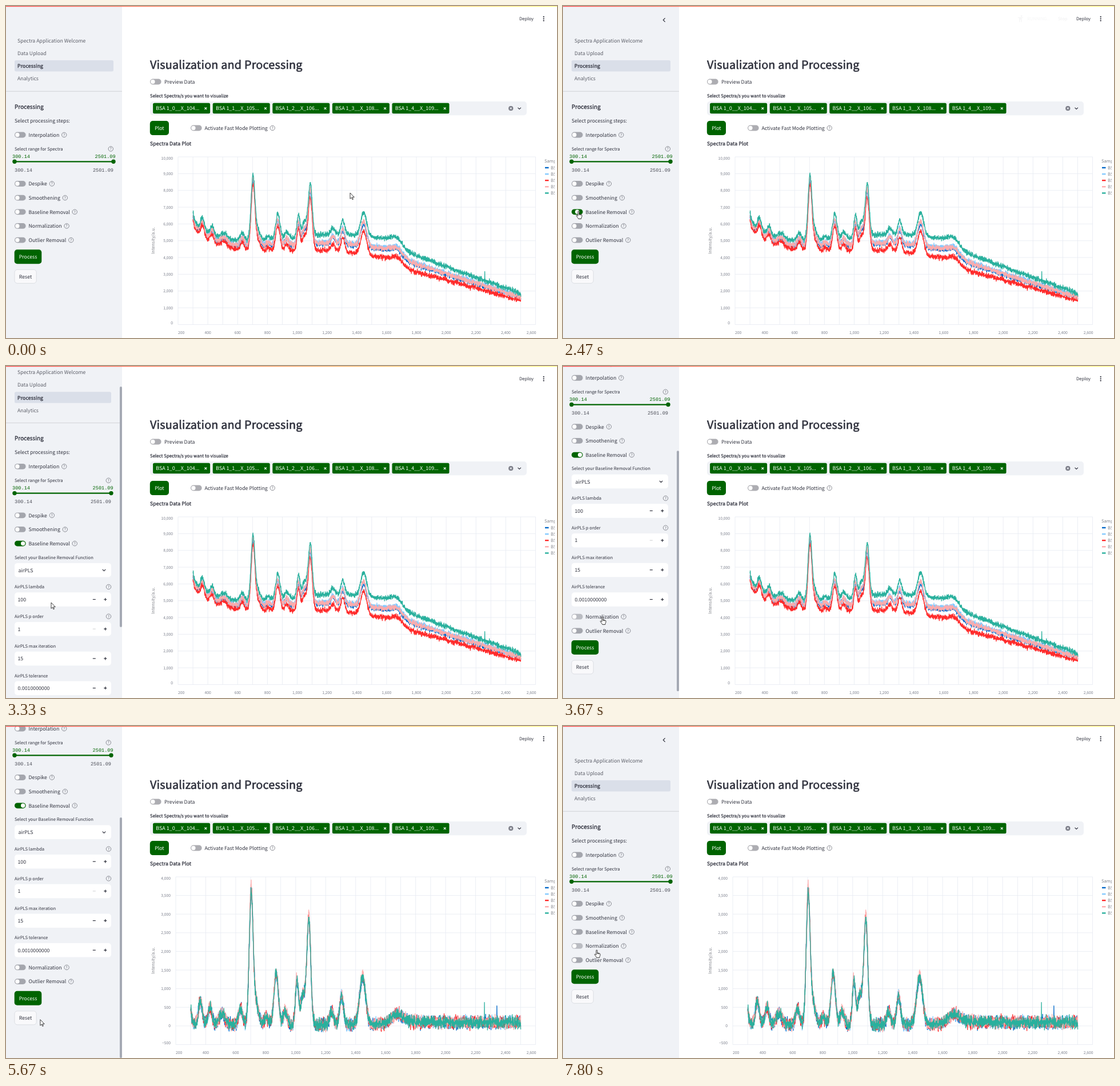
Animation, 964 px wide and 581 px high, one loop 8000 ms. Source, as an HTML page with a canvas:

```html
<!DOCTYPE html>
<html lang="en">
<head>
<meta charset="utf-8">
<title>Spectra processing</title>
<style>
html, body { margin: 0; width: 100%; height: 100%; overflow: hidden; background: #fff; }
canvas, svg { position: absolute; left: 0; top: 0; width: 964px; height: 581px; }
svg { overflow: hidden; }
text {
  font: 8.77px "Noto Sans CJK JP", "Noto Sans CJK SC", "Open Sans", sans-serif;
  fill: #31333f; text-rendering: geometricPrecision; white-space: pre;
}
.semi { stroke: #31333f; stroke-width: .034em; stroke-linejoin: round; letter-spacing: .011em; }
.title { font-size: 19.75px; }
.head { font-size: 9.88px; }
.small { font-size: 7.67px; }
.nav { fill: #5d5f69; }
.mono { font: 8.6px "Liberation Mono", monospace; fill: #4c4e58; }
.green { fill: #006400; }
.white { fill: #fff; }
.tag { font-size: 8.95px; fill: #fff; }
.gray { fill: #83858c; }
.end { text-anchor: end; }
.mid { text-anchor: middle; }
.line { fill: none; stroke: #31333f; stroke-width: 1.2; }
.help { fill: none; stroke: #6f717a; stroke-width: .8; }
.q { font-size: 6.3px; fill: #5d5f69; text-anchor: middle; }
</style>
</head>
<body>
<script>
const W = 964, H = 581, LOOP = 8000;
const FONT = '"Noto Sans CJK JP", "Noto Sans CJK SC", "Open Sans", sans-serif';

const clamp = (v, a = 0, b = 1) => Math.min(b, Math.max(a, v));
const ease = u => { u = clamp(u); return u * u * (3 - 2 * u); };
const bell = (x, c, w) => Math.exp(-((x - c) ** 2) / (2 * w * w));

// ---------- spectra ----------
const COLORS = ['#0068c9', '#83c9ff', '#ff2b2b', '#ffabab', '#29b09d'];
const DROP = [.58, .47, 1, .54, 0];

// Centre, height and, for broad ones, width.
const PEAKS = [
  [290, 560], [364, 620], [429, 470], [510, 290, 22], [632, 430], [703, 3480], [735, 560, 18],
  [805, 210], [870, 1350, 15], [930, 360], [1008, 1150, 10], [1050, 800, 18], [1088, 2750],
  [1240, 370], [1306, 760], [1446, 1270, 20], [1680, 240, 38]
];

function random(seed) {
  return () => {
    seed = seed + 0x6D2B79F5 | 0;
    let r = Math.imul(seed ^ seed >>> 15, 1 | seed);
    r = r + Math.imul(r ^ r >>> 7, 61 | r) ^ r;
    return ((r ^ r >>> 14) >>> 0) / 4294967296;
  };
}

function signal(x) {
  return PEAKS.reduce((sum, [c, h, w = 13]) => sum + h * bell(x, c, w), 30 + 70 * clamp((x - 1500) / 250));
}

// Decay plus a broad hump, then a step down onto a falling line.
function background(x, k) {
  const left = 4850 + 1350 * Math.exp((300 - x) / 120) + 500 * bell(x, 1250, 270);
  const right = 4150 - 3.2 * (x - 1750);
  const mix = 1 / (1 + Math.exp((1690 - x) / 20));
  return (left + (right - left) * mix) * (1 - DROP[k] * (.07 + .17 * clamp((x - 300) / 1400)));
}

function plot(left, lo, hi, step, raw) {
  const cv = document.createElement('canvas'), dpr = window.devicePixelRatio || 1;
  cv.width = W * dpr;
  cv.height = H * dpr;
  document.body.append(cv);
  const g = cv.getContext('2d');
  g.scale(dpr, dpr);
  const X = v => left + (v - 200) * (926.5 - left) / 2400;
  const Y = v => 557.5 - (v - lo) / (hi - lo) * 293.5;
  const line = (x1, y1, x2, y2) => { g.beginPath(); g.moveTo(x1, y1); g.lineTo(x2, y2); g.stroke(); };
  const label = v => v.toLocaleString('en-US').replace('-', '\u2212');

  g.textRendering = 'geometricPrecision';
  g.font = '6.75px ' + FONT;
  g.fillStyle = '#7d808d';
  g.strokeStyle = '#e6eaf1';
  g.lineWidth = .8;
  for (let v = 200; v <= 2600; v += 100) {
    line(X(v), 264, X(v), 557.5);
    if (v % 200) continue;
    g.textAlign = v === 200 ? 'left' : v === 2600 ? 'right' : 'center';
    g.fillText(label(v), X(v) + (v === 2600 ? 1 : 0), 573.8);
  }
  g.textAlign = 'right';
  for (let v = lo; v <= hi; v += step) {
    line(left, Y(v), 926.5, Y(v));
    g.fillText(label(v), left - 9, clamp(Y(v), 266.3, 554.8) + 2.5);
  }

  g.lineWidth = 1.3;
  g.lineJoin = 'round';
  COLORS.forEach((color, k) => {
    const rnd = random(71 + k * 13), gain = (raw ? 1.1 : 1) * (k === 3 ? 1.05 : 1);
    g.strokeStyle = color;
    g.beginPath();
    for (let x = 300; x <= 2501; x++) {
      const noise = (rnd() + rnd() + rnd() - 1.5) * 160;
      const spike = k === 4 && x === 2259 ? 530 : k === 0 && x === 2342 ? 340 : 0;
      g.lineTo(X(x), Y(signal(x) * gain + noise + spike + (raw ? background(x, k) : 0)));
    }
    g.stroke();
  });
  return cv;
}

const rawPlot = plot(301, 0, 10000, 1000, true);
const cleanPlot = plot(297, -500, 4000, 500, false);

// ---------- page ----------
const ruler = document.createElement('canvas').getContext('2d');
ruler.font = '8.77px ' + FONT;

const text = (x, y, s, cls = '') => `<text x="${x}" y="${y}" dy=".38em" class="${cls}">${s}</text>`;
const box = (x, y, w, h, fill, r = 4.9, extra = '') =>
  `<rect x="${x}" y="${y}" width="${w}" height="${h}" rx="${r}" fill="${fill}" ${extra}/>`;
const help = (x, y) => `<circle cx="${x}" cy="${y}" r="4.2" class="help"/>` + text(x, y, '?', 'q');
const cross = (x, y, r, color) =>
  `<path d="M${x - r} ${y - r}l${2 * r} ${2 * r}m0 ${-2 * r}l${-2 * r} ${2 * r}" stroke="${color}" stroke-width="1.1"/>`;
const down = (x, y) => `<path d="M${x - 2.7} ${y - 1.4}l2.7 2.7l2.7-2.7" class="line"/>`;
const toggle = (x, y, id = '', off = '#adadb2') => `<g id="${id}">` +
  box(x, y - 4.9, 19.6, 9.8, off) + `<circle cx="${x + 4.9}" cy="${y}" r="3.7" fill="#fff"/></g>`;
const hintX = (x, s) => x + ruler.measureText(s).width + 8.5;

const SHIFT = 258.5, DEPTH = 221, BASELINE = 3;
const rows = ['Interpolation', 'Despike', 'Smoothening', 'Baseline Removal', 'Normalization', 'Outlier Removal']
  .map((name, i) => ({
    name, id: 'row' + i, hint: hintX(39.5, name), tail: i > BASELINE,
    y: i ? 311 + 24.65 * (i - 1) : 225.5
  }));
const row = r => toggle(15, r.y, r.id) + text(39.5, r.y, r.name) + help(r.hint, r.y);

const inputs = [['lambda', '100'], ['p order', '1'], ['max iteration', '15'], ['tolerance', '0.0010000000']];
const input = ([name, value], i) => {
  const y = 436.2 + 51.7 * i, mid = y + 22;
  return text(15, y, 'AirPLS ' + name, 'small') + (i < 2 ? help(179.5, y) : '') +
    box(15, y + 9.8, 169, 24.5, '#fff') + text(20.5, mid, value) +
    `<path d="M151.8 ${mid}h5" class="line" opacity="${i === 1 ? .2 : 1}"/>` +
    `<path d="M171.3 ${mid}h5m-2.5-2.5v5" class="line"/>`;
};

const pages = ['Spectra Application Welcome', 'Data Upload', 'Processing', 'Analytics']
  .map((s, i) => text(20, 60.7 + 22.1 * i, s, i === 2 ? 'semi' : 'nav')).join('');

const sidebar = `
<rect width="203" height="${H}" fill="#f0f2f6"/>
<g id="content">
  <path id="fold" d="M178.6 21.2l-3.3 3.3l3.3 3.3" class="line"/>
  ${box(15, 95, 173, 19.5, '#dadfe9', 2.5, 'id="nav"')}${pages}
  <path d="M0 149.3H203" stroke="#cacccf" stroke-width=".8"/>
  ${text(15, 176, 'Processing', 'semi head')}
  ${text(15, 200.5, 'Select processing steps:')}
  ${text(15, 250, 'Select range for Spectra', 'small')}
  ${text(11, 262.6, '300.14', 'mono green')}
  ${text(15, 286.6, '300.14', 'mono')}
  <path id="track" stroke="#006400" stroke-width="2.3"/>
  <circle cx="15" cy="272.3" r="3.7" class="green"/>
  <g id="edge">
    <circle cx="188" cy="272.3" r="3.7" class="green"/>
    ${text(191.7, 262.6, '2501.09', 'mono green end')}
    ${text(188, 286.6, '2501.09', 'mono end')}
    ${help(183.3, 250)}
  </g>
  ${rows.filter(r => !r.tail).map(row).join('')}
  <g id="fields">
    ${text(15, 384.3, 'Select your Baseline Removal Function', 'small')}
    ${box(15, 394.6, 169, 24.5, '#fff')}${text(21.5, 407, 'airPLS')}${down(171.5, 407)}
    ${inputs.map(input).join('')}
  </g>
  <g id="tail">
    ${rows.filter(r => r.tail).map(row).join('')}
    <g id="process">${box(14.7, 426.3, 47.6, 25, '#006400')}${text(38.5, 438.8, 'Process', 'white mid')}</g>
    <g id="reset">
      ${box(15, 461.3, 38.2, 24, '#f9f9fb', 4.9, 'stroke-width=".7"')}${text(34, 473.2, 'Reset', 'mid')}
    </g>
  </g>
</g>
${box(199, 0, 4, H * H / (H + DEPTH), '#a5a9b4', 2, 'id="bar"')}`;

const tags = [104, 105, 106, 108, 109].map((n, i) => {
  const x = 257.1 + i * 104.6;
  return box(x, 169.8, 100, 18.5, '#006400', 2.5) + text(x + 5.2, 179, `BSA 1_${i}__X_${n}...`, 'tag') +
    cross(x + 92.2, 179.3, 1.9, '#fff');
}).join('');

const legend = COLORS.map((c, i) =>
  `<path d="M943 ${283 + i * 11.1}h6.5" stroke="${c}" stroke-width="2.4"/>` +
  text(953, 283 + i * 11.1, `BSA 1_${i}`, 'gray small')).join('');

const FAST = 'Activate Fast Mode Plotting';
const main = `
${text(252, 102.3, 'Visualization and Processing', 'semi title')}
${toggle(252, 132.5)}${text(277, 132.5, 'Preview Data')}
${text(252, 157, 'Select Spectra/s you want to visualize', 'semi small')}
${box(252, 167, 659, 24.2, '#f0f2f6')}${tags}
<circle cx="883.3" cy="179.2" r="4.1" fill="#7b7d87"/>${cross(883.3, 179.2, 1.5, '#f0f2f6')}${down(898.2, 179.2)}
${box(251.8, 201, 33.2, 25, '#006400')}${text(268.4, 213.5, 'Plot', 'white mid')}
${toggle(323, 213.5)}${text(347.5, 213.5, FAST)}${help(hintX(347.5, FAST), 213.5)}
${text(252, 240.3, 'Spectra Data Plot', 'semi')}
<g transform="translate(257 410.5) rotate(-90)">${text(0, 0, 'Intensity/a.u.', 'gray small mid')}</g>
<g clip-path="url(#cut)">${text(942, 271, 'Samples', 'gray small')}${legend}</g>
<g id="running">
  <g fill="none" stroke="#83858c" stroke-width="1.3" stroke-linecap="round" stroke-linejoin="round">
    <circle cx="802.2" cy="17.6" r=".8"/>
    <path id="run" d="M796.5 20.6l2.6-1.2l2.4 1l-1.6 3l2.3 1.4l-.6 2.9M802 20.6l2 1.4M799.4 23.2l-1.3 2.4l-2.6.3"/>
    <path id="stand" d="M796.6 20.4h7.6M800.4 20.4v3.2M798.7 20.6v7M802 20.6v7"/>
  </g>
  ${text(812, 22.4, 'RUNNING...', 'gray small')}${text(866, 22.4, 'Stop', 'small')}
</g>
${text(898, 22.4, 'Deploy', 'small')}
${[-1, 0, 1].map(i => `<circle cx="940.7" cy="${22.3 + 3.4 * i}" r="1.15" fill="#31333f"/>`).join('')}`;

document.body.insertAdjacentHTML('beforeend', `
<svg viewBox="0 0 ${W} ${H}">
  <defs>
    <clipPath id="cut"><rect x="930" y="260" width="30" height="80"/></clipPath>
    <linearGradient id="top"><stop stop-color="#ff4b4b"/><stop offset="1" stop-color="#fffd80"/></linearGradient>
  </defs>
  ${main}${sidebar}
  <rect width="${W}" height="1.25" fill="url(#top)"/>
  <g id="cursor" fill="#fff" stroke="#111" stroke-width=".8" stroke-linejoin="round">
    <path id="arrow" d="M0 0V10.4L2.4 8.2L4 11.8L5.5 11.1L3.9 7.6H7.3Z"/>
    <path id="hand" d="M-1 1a1 1 0 0 1 2 0V5l1.3.2l1.4.4l1.4.4l.9.9V9.6l-1.1 2.5V13.5H0L-.8 12L-3.6 8.5c-.6-1 .4-1.7 1.2-1l1.4 1.2ZM1 5v2M2.5 5.4v1.8M4 5.8v1.6"/>
  </g>
</svg>`);

// ---------- motion ----------
const ON = 2400, OPEN = 2700, PROCESSED = 4800, OFF = 6800, CLOSED = 7000;

// Pointer stops: time, x, y.
const STOPS = [
  [270, 602, 327], [1070, 147, 464], [1800, 28, 352], [2000, 27, 359], [2470, 27, 359],
  [3100, 79, 414], [3330, 79, 414], [3670, 69, 439], [4070, 57, 498], [4270, 50, 482],
  [5470, 50, 482], [5650, 60, 515], [6270, 30, 147], [OFF, 28, 145], [6870, 33, 157],
  [7130, 78, 333], [7470, 60, 407], [7670, 60, 407], [7800, 59, 392]
];

function pointer(t) {
  const i = STOPS.findIndex(s => s[0] > t);
  if (i < 1) return STOPS[i ? STOPS.length - 1 : 0].slice(1);
  const [t0, x0, y0] = STOPS[i - 1], [t1, x1, y1] = STOPS[i];
  const u = ease((t - t0) / (t1 - t0));
  return [x0 + (x1 - x0) * u, y0 + (y1 - y0) * u];
}

const during = (t, from, to) => t >= from && t < to;
const fade = (t, from, to) => during(t, from, to) ? clamp((t - from) / 150) ** 2 : 0;

const $ = id => document.getElementById(id);
const show = (id, on) => { $(id).style.display = on ? '' : 'none'; };
const set = (id, name, value) => $(id).setAttribute(name, value);

function draw(t) {
  const [x, y] = pointer(t);
  const open = during(t, OPEN, CLOSED), shift = open ? SHIFT : 0, inset = open ? 4 : 0;
  const scroll = open ? DEPTH * ease((t - 3133) / 645) : 0;
  const over = (cy, half, right) => x > 15 && x < right && Math.abs(y + scroll - cy) < half;

  rawPlot.style.display = t < PROCESSED ? '' : 'none';
  cleanPlot.style.display = t < PROCESSED ? 'none' : '';

  set('content', 'transform', `translate(0 ${-scroll})`);
  set('tail', 'transform', `translate(0 ${shift})`);
  set('edge', 'transform', `translate(${-inset} 0)`);
  set('nav', 'width', 173 - inset);
  set('track', 'd', `M15 272.3H${188 - inset}`);
  set('bar', 'y', scroll * H / (H + DEPTH));
  show('bar', open);
  show('fields', open);
  show('fold', x < 203);

  let hand = false;
  rows.forEach((r, i) => {
    const hover = over(r.y + (r.tail ? shift : 0), 8, r.hint + 5);
    const active = i === BASELINE;
    const lit = hover || active && during(t, OFF, OFF + 150);
    const slide = active ? clamp((t - ON) / 140) - clamp((t - OFF) / 140) : 0;
    const [track, knob] = $(r.id).children;
    track.setAttribute('fill', active && during(t, ON, OFF) ? '#006400' : lit ? '#babcc2' : '#a4a6ad');
    knob.setAttribute('cx', 19.9 + 9.8 * slide);
    hand = hand || hover;
  });
  const onProcess = over(438.9 + shift, 12.2, 62), onReset = over(473.3 + shift, 12, 53);
  const [frame, caption] = $('reset').children;
  $('process').firstChild.setAttribute('fill', onProcess ? '#004a00' : '#006400');
  frame.setAttribute('stroke', onReset ? '#006400' : '#d2d4da');
  caption.style.fill = onReset ? '#006400' : '#31333f';
  hand = hand || onProcess || onReset;

  const busy = fade(t, ON + 30, OPEN + 40) + fade(t, 4370, PROCESSED) + fade(t, OFF + 30, CLOSED + 60);
  $('running').style.opacity = busy;
  show('run', busy >= .5);
  show('stand', busy < .5);

  set('cursor', 'transform', `translate(${x} ${y})`);
  show('hand', hand);
  show('arrow', !hand);
}

function tick() {
  draw(performance.now() % LOOP);
  requestAnimationFrame(tick);
}
tick();
</script>
</body>
</html>
```
